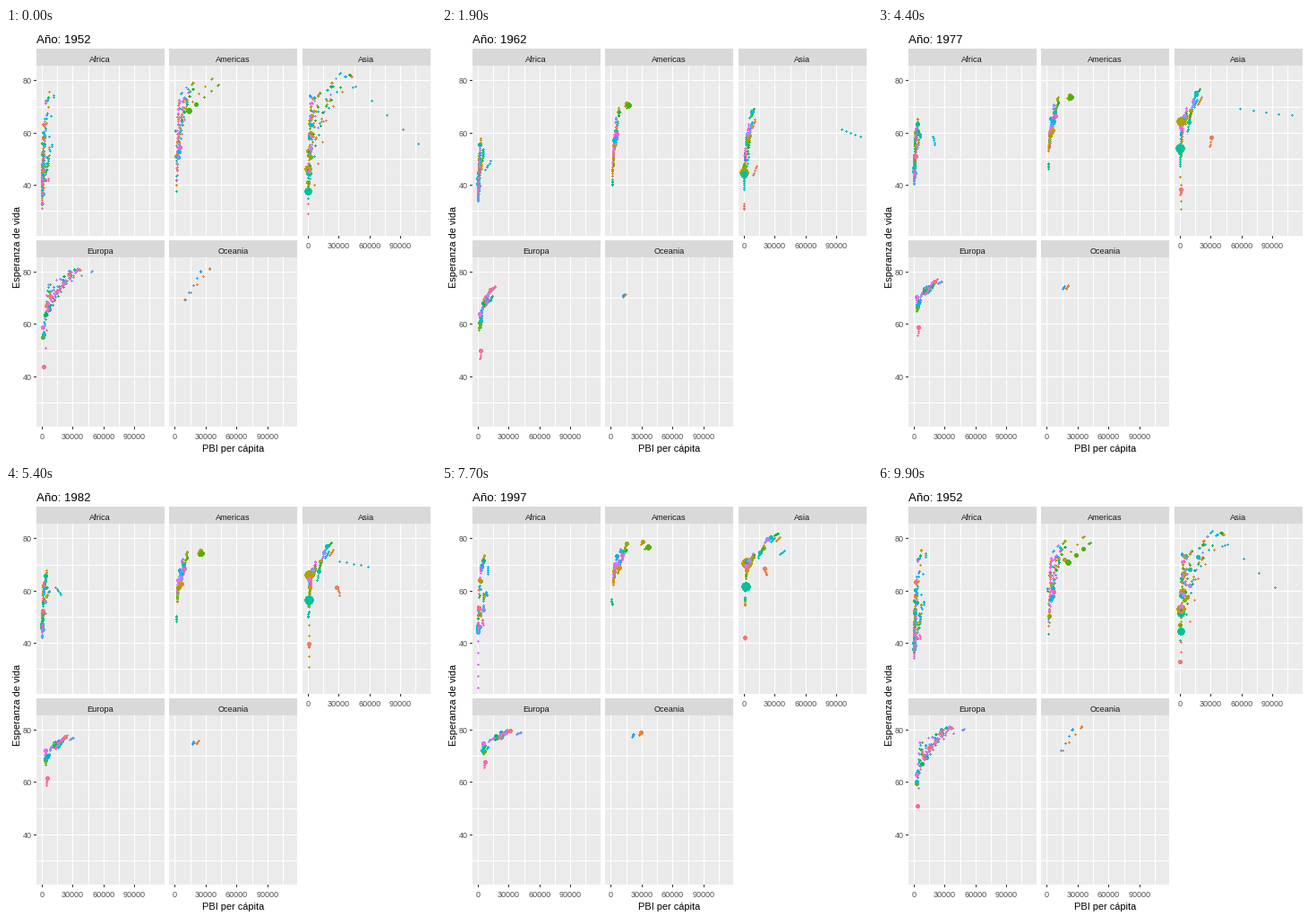
These frames come from a looping animation (480 px wide and 480 px high, 10000 ms). A matplotlib script:

```python
import math
import random

import matplotlib.pyplot as plt
import numpy as np
from matplotlib.animation import FuncAnimation
from matplotlib.patches import Rectangle

SIZE, FRAMES, STATES = 480, 100, 12
WAKE, MOVE = 9, 4
COUNTRIES = 142
PANEL_W, PANEL_H, STRIP_H = 143, 189.6, 19
GROWTH = {"Africa": 3.6, "Americas": 2.4, "Asia": 2.6, "Europa": 1.3, "Oceania": 2.2}
PANELS = {name: (33.71 + 148.53 * (i % 3), 23 + 213.7 * (i // 3))
          for i, name in enumerate(GROWTH)}
U = np.linspace(0, 1, STATES)

# Landmarks: region, hue rank, final population (M), income (thousands) and
# life keys spread evenly over the period, optional (state, depth) of a dip.
LANDMARKS = [
    ("Asia", 25, 1318, (.4, .75, 2, 5), (46, 62, 68, 73), (2, 10)),
    ("Asia", 62, 1110, (.55, .83, 2.45), (37.4, 55.6, 64.7)),
    ("Asia", 71, 127, (3.2, 17.8, 31.7), (63, 76.3, 82.6)),
    ("Asia", 74, 2.5, (108, 113.5, 95, 81, 109, 59, 31, 28, 35, 40, 35, 47),
     (55.6, 70.5, 77.6)),
    ("Asia", 4, 27, (6.5, 13, 33, 27, 20, 22), (39.9, 60, 72.8)),
    ("Asia", 0, 32, (.8, 1), (28.8, 39, 43.8)),
    ("Asia", 20, 14, (.4, 1.7), (39.4, 59.7), (5, 18)),
    ("Americas", 41, 301, (14, 24.5, 43), (68.4, 73.9, 78.2)),
    ("Americas", 22, 33, (11.4, 36.3), (68.8, 80.7)),
    ("Americas", 16, 190, (2.1, 9.1), (50.9, 72.4)),
    ("Americas", 58, 8, (1.8, 1.2), (37.6, 60.9)),
    ("Africa", 95, 135, (1.1, 2), (36.3, 45, 46.9)),
    ("Africa", 78, 6, (2.4, 14, 22, 11, 9.5, 12), (42.7, 60, 74)),
    ("Africa", 112, 9, (.5, .9), (42, 46), (8, 22)),
    ("Europa", 96, 4.6, (10, 49), (72.7, 80.2)),
    ("Europa", 133, 71, (2, 8.5), (43.6, 60.2, 71.8)),
    ("Oceania", 7, 20, (10, 34.4), (69.1, 81.2)),
    ("Oceania", 92, 4, (10.6, 25.2), (69.4, 80.2)),
]

# Groups: region, count, (low, high) of first and last income,
# of first and last life, and the largest mid-period hump in life.
GROUPS = [
    ("Africa", 37, (.4, 2.3), (.3, 2.8), (31, 46), (43, 63), 7),
    ("Africa", 6, (1.4, 2.8), (4, 9), (42, 52), (71, 76), 0),
    ("Africa", 6, (1, 5), (3, 13), (37, 48), (40, 57), 14),
    ("Americas", 11, (3, 7), (8, 18), (50, 66), (72, 79), 0),
    ("Americas", 10, (1.8, 3.5), (2.7, 7), (40, 53), (66, 75), 1),
    ("Asia", 8, (1.2, 6), (19, 43), (42, 63), (75, 82), 3),
    ("Asia", 8, (1.2, 4.5), (4, 12), (43, 58), (70, 75), 2),
    ("Asia", 10, (.4, 1), (1, 4), (33, 48), (59, 74), 1),
    ("Europa", 16, (4.5, 14), (26, 39), (65, 72.5), (78.5, 82), 0),
    ("Europa", 12, (1.2, 6.5), (6, 22), (55, 66), (72, 78), 2.5),
]

rng = random.Random(52)


def keyed(keys):
    return np.interp(U, np.linspace(0, 1, len(keys)), keys)


def landmark(region, hue, pop, income, life, dip=(0, 0)):
    at, depth = dip
    sag = depth * np.exp(-((np.arange(STATES) - at) / .8) ** 2)
    return region, hue, pop, keyed(income), keyed(life) - sag


def member(region, hue, income0, income1, life0, life1, hump):
    """A minor country: the richer it is, the longer its people live."""
    rank = rng.random()

    def pick(span, power=1):
        t = min(1, max(0, rank + rng.uniform(-.25, .25))) ** power
        return span[0] + t * (span[1] - span[0])

    g0, g1, l0, l1 = pick(income0, 1.4), pick(income1, 1.4), pick(life0), pick(life1)
    income = g0 + (g1 - g0) * U ** 1.15
    life = (l0 + (l1 - l0) * (1 - (1 - U) ** 1.4)
            + hump * rng.uniform(.4, 1) * np.sin(math.pi * U))
    return region, hue, math.exp(rng.uniform(0, math.log(60))), income, life


rows = [landmark(*entry) for entry in LANDMARKS]
hues = sorted(set(range(COUNTRIES)) - {row[1] for row in rows})
rng.shuffle(hues)
for region, count, *spans in GROUPS:
    rows += [member(region, hues.pop(), *spans) for _ in range(count)]
rows.sort(key=lambda row: row[1])


def hue_color(rank):
    """Evenly spaced hue at luminance 65 and chroma 100 (polar LUV)."""
    h = np.radians(15 + 360 * rank / COUNTRIES)
    lum, chroma = 65, 100
    u = chroma * np.cos(h) / (13 * lum) + .1978
    v = chroma * np.sin(h) / (13 * lum) + .4683
    y = ((lum + 16) / 116) ** 3
    x, z = y * 9 * u / (4 * v), y * (12 - 3 * u - 20 * v) / (4 * v)
    rgb = np.clip([3.2406 * x - 1.5372 * y - .4986 * z,
                   -.9689 * x + 1.8758 * y + .0415 * z,
                   .0557 * x - .204 * y + 1.057 * z], 0, 1)
    return np.where(rgb > .0031308, 1.055 * rgb ** (1 / 2.4) - .055, 12.92 * rgb)


def px(region, income):
    return PANELS[region][0] + 6.5 + (income - .241) * 130 / 113.282


def py(region, life):
    return PANELS[region][1] + STRIP_H + 8.8 + (82.603 - life) * 172.2 / 59.004


# One entry per state, the first repeated at the end to close the loop.
track = np.array([[px(r, g), py(r, l),
                   1 + 5 * np.sqrt(p * GROWTH[r] ** (U - 1) / 1319)]
                  for r, _, p, g, l in rows]).transpose(2, 1, 0)
track = np.concatenate([track, track[:1]])
colors = np.array([hue_color(row[1]) for row in rows])

# Each state is held, then left in MOVE equal steps.
arrive = [min(8 * k + max(0, min(k - 1, 4)), FRAMES) for k in range(STATES + 1)]
clock, phase = [0], [0]
for k in range(1, STATES + 1):
    clock += [arrive[k] - MOVE, arrive[k]]
    phase += [k - 1, k]


def state_at(frame):
    return np.interp(frame % FRAMES, clock, phase)


def pose(frame):
    s = state_at(frame)
    k = min(int(s), STATES - 1)
    return track[k] + (s - k) * (track[k + 1] - track[k])


plt.rcParams["font.family"] = "Liberation Sans"
fig = plt.figure(figsize=(SIZE / 72, SIZE / 72), dpi=72, facecolor="white")
ax = fig.add_axes([0, 0, 1, 1])
ax.set(xlim=(0, SIZE), ylim=(SIZE, 0))
ax.axis("off")


def box(x0, y0, x1, y1, color):
    x0, y0, x1, y1 = map(round, (x0, y0, x1, y1))
    ax.add_patch(Rectangle((x0, y0), x1 - x0, y1 - y0, fc=color, lw=0,
                           antialiased=False))


def label(x, y, text, size=9, color="#4D4D4D", ha="center"):
    return ax.text(x, y, text, size=size, color=color, ha=ha, va="baseline")


for name, (left, strip) in PANELS.items():
    top, right = strip + STRIP_H, left + PANEL_W
    bottom = top + PANEL_H
    box(left, strip, right, top, "#D9D9D9")
    box(left, top, right, bottom, "#EBEBEB")
    label((left + right) / 2, round(strip) + 15, name, 9.2, "#1A1A1A")
    for income in range(0, 106, 15):
        x = round(px(name, income))
        box(x, top, x + 1, bottom, "white")
        if income % 30 == 0 and name in ("Asia", "Europa", "Oceania"):
            box(x, bottom, x + 1, bottom + 3, "#333333")
            label(x + .5, round(bottom) + 14, str(income * 1000))
    for life in range(30, 81, 10):
        y = round(py(name, life))
        box(left, y, right, y + 1, "white")
        if life % 20 == 0 and left < 100:
            box(left - 3, y, left, y + 1, "#333333")
            label(29, y + 4, str(life), ha="right")

label(254, 473, "PBI per cápita", 11, "black")
ax.text(18, 244.5, "Esperanza de vida", size=11, rotation=90,
        ha="right", va="center", color="black")
title = label(34, 17, "", 13.2, "black", ha="left")
dots = ax.scatter([], [], linewidths=0, antialiased=False, zorder=5)


def draw(frame):
    spots, radii = [], []
    for age in range(WAKE, -1, -1):
        x, y, size = pose(frame - age)
        fade = (1 - age / (WAKE + 1)) ** 3
        points = size * fade * 2.845 + .94
        # Every touched pixel is filled, so stay inside the whole radius.
        radii.append(np.maximum(1, np.floor(.375 * points)) - .35)
        spots.append(np.column_stack([np.floor(x) + .5, np.floor(y) + .5]))
    dots.set_offsets(np.concatenate(spots))
    dots.set_sizes((2 * np.concatenate(radii)) ** 2)
    dots.set_facecolor(np.tile(colors, (WAKE + 1, 1)))
    title.set_text(f"Año: {1952 + 5 * (int(state_at(frame) + .5) % STATES)}")
    return dots, title


anim = FuncAnimation(fig, draw, frames=FRAMES, interval=100, repeat=True, repeat_delay=0)
plt.show()
```
